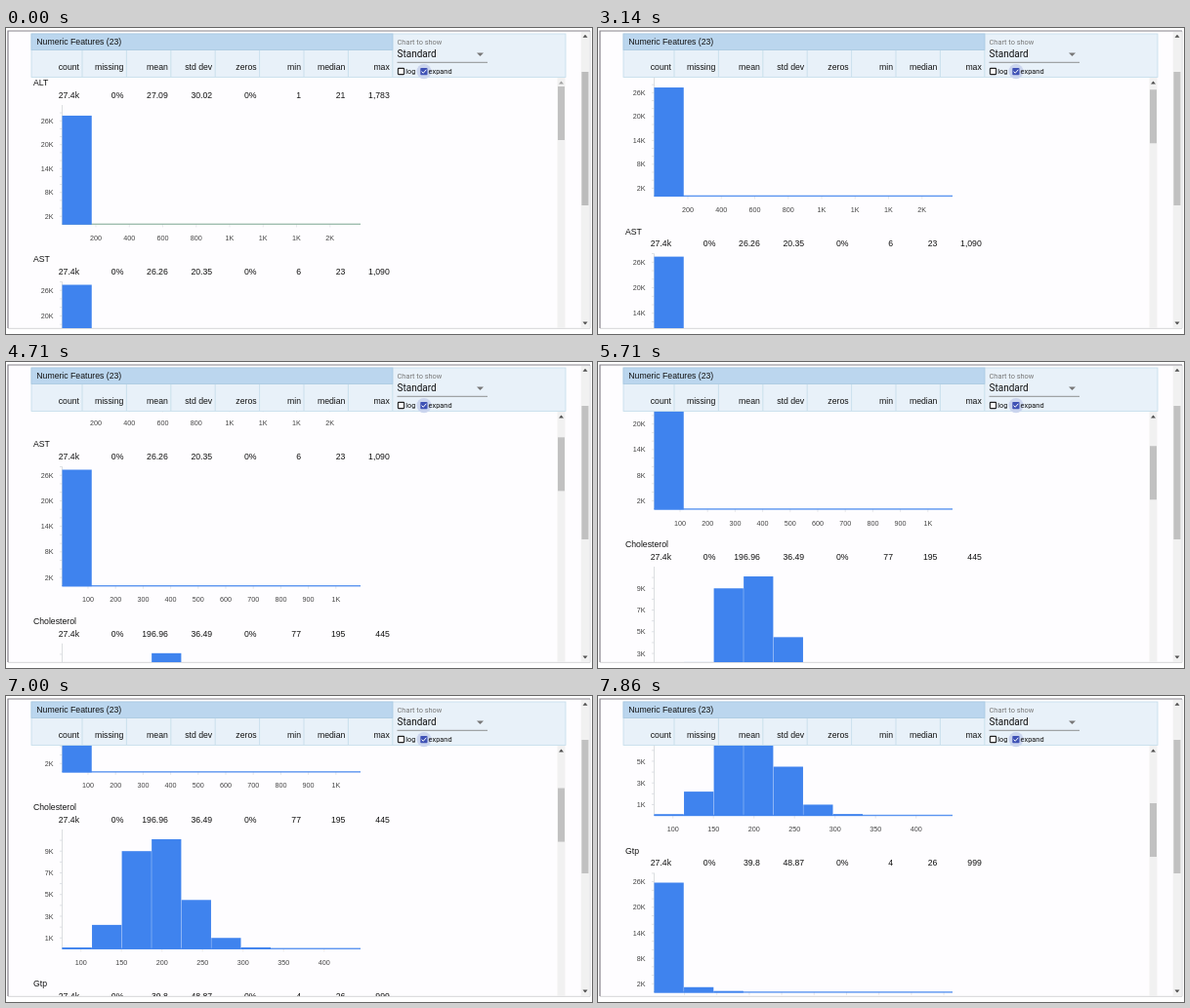
Write an HTML page that moves like this. It is 600 px wide and 314 px high and loops after 8 s.

```html
<!DOCTYPE html>
<html>
<head>
<meta charset="utf-8">
<style>
html, body { margin: 0; width: 100%; height: 100%; overflow: hidden; background: #fff; }
svg { display: block; width: 600px; height: 314px; font: 8.7px "Liberation Sans", Arial, sans-serif; }
.ui { font-family: Roboto, sans-serif; font-size: 7.4px; }
.tick { font-size: 7.2px; fill: #444; }
</style>
</head>
<body>
<svg id="stage" viewBox="0 0 600 314">
  <clipPath id="view"><rect x="26" y="50.5" width="538" height="257.5"/></clipPath>
</svg>
<script>
const stage = document.getElementById('stage');

function add(parent, tag, attrs, text) {
  const el = document.createElementNS('http://www.w3.org/2000/svg', tag);
  for (const key in attrs) el.setAttribute(key, attrs[key]);
  if (text !== undefined) el.textContent = text;
  parent.appendChild(el);
  return el;
}
const rect = (p, x, y, width, height, fill, more) => add(p, 'rect', {x, y, width, height, fill, ...more});
const path = (p, d, attrs) => add(p, 'path', {d, fill: 'none', ...attrs});
const label = (p, x, y, text, attrs) => add(p, 'text', {x, y, fill: '#111', ...attrs}, text);

const COLUMN = 45.4, SECTION = 181.4, BASE = 145.4, LEFT = 57.5, BIN = 30.55;
const BLUE = '#3f83ee', GREEN = '#8fb3a2', THUMB = '#c1c1c1';
const columnEnd = i => 75 + i * COLUMN;
const RIGHT = {'text-anchor': 'end'};

// yTicks: [first, step, count] in thousands; xTicks: [first x, step x, labels]
const features = [
  {name: 'ALT', stats: '27.4k 0% 27.09 30.02 0% 1 21 1,783', unit: 4.083, yTicks: [2, 6, 5], minor: 2,
   xTicks: [92, 34.25, '200 400 600 800 1K 1K 1K 2K'], bins: [27.3]},
  {name: 'AST', stats: '27.4k 0% 26.26 20.35 0% 6 23 1,090', unit: 4.37, yTicks: [2, 6, 5], minor: 2,
   xTicks: [84, 28.2, '100 200 300 400 500 600 700 800 900 1K'], bins: [27.3]},
  {name: 'Cholesterol', stats: '27.4k 0% 196.96 36.49 0% 77 195 445', unit: 11.13, yTicks: [1, 2, 5], minor: 1,
   xTicks: [76.7, 41.5, '100 150 200 250 300 350 400'], bins: [.12, 2.2, 9, 10.1, 4.5, 1, .13]},
  {name: 'Gtp', stats: '27.4k 0% 39.8 48.87 0% 4 26 999', unit: 4.36, yTicks: [2, 6, 5], minor: 2,
   xTicks: [88.5, 33.2, '100 200 300 400 500 600 700 800 900'], bins: [25.8, 1.2, .3]}
];

function drawFeature(parent, f, i) {
  const g = add(parent, 'g', {transform: `translate(0 ${56 + i * SECTION})`});
  label(g, 28, 3, f.name);
  f.stats.split(' ').forEach((s, c) => label(g, columnEnd(c), 15.9, s, RIGHT));

  path(g, `M${LEFT} 23V${BASE}`, {stroke: '#d2d6da', 'stroke-width': .8});
  for (let v = f.minor; v * f.unit < BASE - 23; v += f.minor)
    path(g, `M55 ${BASE - v * f.unit}h2.5`, {stroke: '#d2d6da', 'stroke-width': .7});
  const [first, step, count] = f.yTicks;
  for (let k = 0; k < count; k++) {
    const v = first + k * step;
    label(g, 48.5, BASE - v * f.unit + 2.6, v + 'K', {...RIGHT, class: 'tick'});
  }
  const [x0, dx, names] = f.xTicks;
  names.split(' ').forEach((s, k) => {
    const x = x0 + k * dx;
    path(g, `M${x} ${BASE}v3`, {stroke: '#dde0e4', 'stroke-width': .7});
    label(g, x, 161.9, s, {'text-anchor': 'middle', class: 'tick'});
  });

  const line = rect(g, LEFT, BASE - .8, BIN * 10, 1.4, BLUE, {opacity: .85});
  f.bins.forEach((v, k) =>
    rect(g, LEFT + k * BIN, BASE - v * f.unit, BIN - .3, v * f.unit + .4, BLUE));
  return line;
}

// Page frame
rect(stage, 2, 3, 596, 305, '#fefdff');
path(stage, 'M2 308.3H598V3', {stroke: '#d4d4d6'});
path(stage, 'M2 308V3H598', {stroke: '#85828a', 'stroke-width': 1.2});

// Scrolling list
const list = add(add(stage, 'g', {'clip-path': 'url(#view)'}), 'g', {});
const baselines = features.map((f, i) => drawFeature(list, f, i));

// Table header
rect(stage, 26, 6, 547, 44.5, '#e8f1f9', {stroke: '#c3dcea', 'stroke-width': .8});
rect(stage, 26, 6, 370, 16.5, '#bbd6ee', {stroke: '#a9c9e0', 'stroke-width': .8});
label(stage, 31.3, 17.3, 'Numeric Features (23)');
'count,missing,mean,std dev,zeros,min,median,max'.split(',').forEach((s, i) => {
  label(stage, columnEnd(i), 43.2, s, RIGHT);
  path(stage, `M${78 + i * COLUMN} 23V50`, {stroke: '#c3dcea', 'stroke-width': .8});
});

// Chart controls
const ui = add(stage, 'g', {class: 'ui'});
label(ui, 400.5, 16.6, 'Chart to show', {fill: '#777'});
label(ui, 400.5, 30.3, 'Standard', {'font-size': 10, style: 'font-size:10px'});
path(ui, 'M400.5 35.3H493', {stroke: '#777', 'stroke-width': .8});
path(ui, 'M482 25.6h7l-3.5 3.5z', {fill: '#777'});
rect(ui, 401.4, 41.4, 6.2, 6.2, '#fff', {stroke: '#222', 'stroke-width': 1.1, rx: .6});
label(ui, 409.2, 47.2, 'log');
add(ui, 'circle', {cx: 428, cy: 44.6, r: 7.6, fill: '#cbd5ee'});
rect(ui, 424.3, 41, 7.2, 7.2, '#3f51b5', {rx: .8});
path(ui, 'M425.6 44.6l1.6 1.7l3.1-3.5', {stroke: '#fff', 'stroke-width': 1});
label(ui, 432.6, 47.2, 'expand');

// Scrollbars
rect(stage, 564.5, 51, 8, 257, '#f1f1f1');
const listArrow = path(stage, 'M566 57.6h5l-2.5-3z', {});
const listThumb = rect(stage, 565, 60, 7, 55, THUMB);
rect(stage, 588.7, 4, 8.6, 304, '#f1f1f1');
path(stage, 'M590.5 9.8h5l-2.5-3zM590.5 301.5h5l-2.5 3z', {fill: '#505050'});
const pageThumb = rect(stage, 589.4, 45, 7, 137, THUMB);

// Wheel notches: each one eases the list down by the same distance
const NOTCH = 73.6, EASE = 350;
const notches = [2992, 3920, 4651, 5626, 6914, 7495];
const ease = u => (1 - Math.cos(Math.PI * Math.min(1, Math.max(0, u)))) / 2;

function render(now) {
  const step = Math.floor((now % 8000) * 7 / 1000 + .05);
  const t = step * 1000 / 7;
  const scroll = notches.reduce((sum, start) => sum + NOTCH * ease((t - start) / EASE), 0);
  const moved = scroll > .5;
  list.setAttribute('transform', `translate(0 ${moved ? -scroll : 0})`);
  listThumb.setAttribute('y', 60 + scroll * .1133);
  listArrow.setAttribute('fill', moved ? '#505050' : '#a3a3a3');
  baselines[0].setAttribute('fill', moved ? BLUE : GREEN);
  pageThumb.setAttribute('fill', step < 8 ? '#bcbcbc' : THUMB);
  requestAnimationFrame(loop);
}
function loop() { render(performance.now()); }
loop();
</script>
</body>
</html>
```
